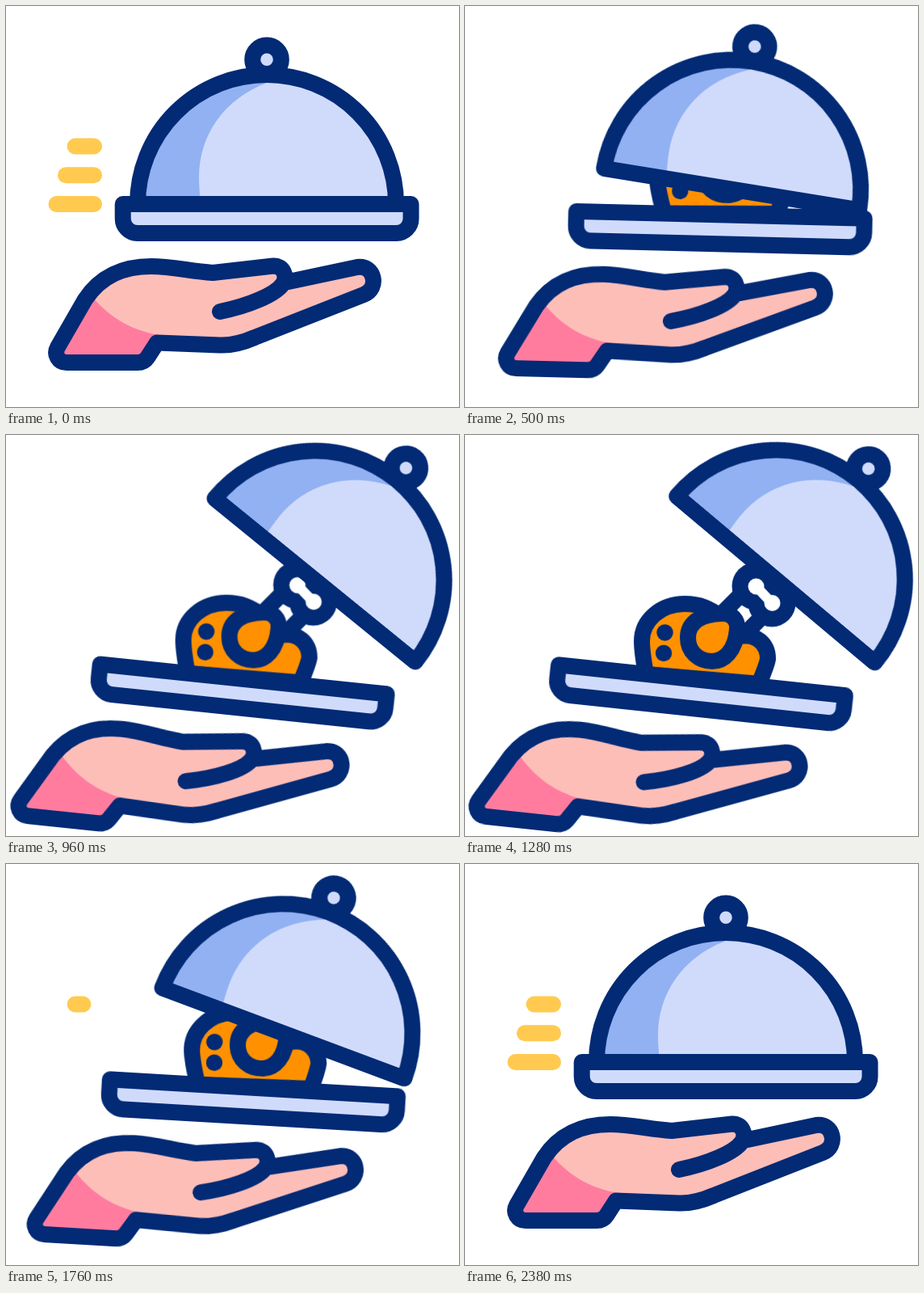
Animation of 561x496 px, one loop 2400 ms. Source, as an HTML page:

```html
<!DOCTYPE html>
<html lang="en">
<head>
<meta charset="utf-8">
<title>Serving dish</title>
<style>
html, body { margin: 0; width: 100%; height: 100%; overflow: hidden; background: #fff; }
svg { display: block; width: 561px; height: 496px; }

.ink { stroke: #022a75; stroke-width: 20; stroke-linejoin: round; stroke-linecap: round; }
.dark { fill: #022a75; }
.pale { fill: #d0dbfc; }
.shade { fill: #92b1f2; }
.skin { fill: #fdbeb8; }
.cuff { fill: #ff7c9f; }
.roast { fill: #ff9100; }
.none { fill: none; }

.serve { transform-origin: 265px 378px; animation: serve 2.4s infinite; }
.lid { transform-origin: 483px 245px; animation: lid 2.4s infinite; }
@keyframes serve {
  0% { transform: translate(0, 0) rotate(0); animation-timing-function: cubic-bezier(.8, 0, .165, 1); }
  50% { transform: translate(-43.5px, 51.5px) rotate(6.1deg); animation-timing-function: cubic-bezier(.8, 0, .135, 1); }
  100% { transform: translate(0, 0) rotate(0); }
}
@keyframes lid {
  0% { transform: translate(0, 0) rotate(0); animation-timing-function: cubic-bezier(.8, 0, .165, 1); }
  50% { transform: translate(50.6px, -44.5px) rotate(34deg); animation-timing-function: cubic-bezier(.78, 0, .135, 1); }
  100% { transform: translate(0, 0) rotate(0); }
}

.dash {
  stroke: #ffca4f; stroke-width: 20; stroke-linecap: round;
  stroke-dasharray: 10 20;
  animation: dash 2.4s ease-in-out infinite;
}
.dash:nth-child(2) { animation-delay: 102ms; }
.dash:nth-child(3) { animation-delay: 204ms; }
/* wipes out to the right, later draws in from the left */
@keyframes dash {
  0% { stroke-dashoffset: 0; }
  8.33% { stroke-dashoffset: -10.1; }
  8.34%, 69.6% { stroke-dashoffset: 10.1; }
  77.9%, 100% { stroke-dashoffset: 0; }
}
</style>
</head>
<body>
<svg viewBox="0 0 561 496">
  <g>
    <path class="dash" pathLength="10" d="M85.6 173.5H109"/>
    <path class="dash" pathLength="10" d="M74 209.3H109"/>
    <path class="dash" pathLength="10" d="M62.5 245H109"/>
  </g>

  <g class="serve">
    <!-- hand -->
    <path class="skin" d="M75 441C65 441 59 431 64 422L98 363C118 333 146 322 180 322C205 322 228 328 256 330L331 322C341 321 347 331 344 341L435 323C456 320 463 349 443 357L308 410C292 417 280 420 265 419.5L187 416.5L175 435Q171 441 163 441Z"/>
    <path class="cuff" d="M75 441C65 441 59 431 64 422L103 355C125 383 153 401 190 407L187 416.5L175 435Q171 441 163 441Z"/>
    <path class="ink none" d="M350 341L435 323C456 320 463 349 443 357L308 410C292 417 280 420 265 419.5L187 416.5L175 435Q171 441 163 441H75C65 441 59 431 64 422L98 363C118 333 146 322 180 322C205 322 228 328 256 330L331 321.5C343 321 349 334 343 343.5C334 357 300 371 265 378"/>

    <!-- roast, drawn in its tilted pose -->
    <g transform="translate(265 378) rotate(-6.1) translate(-221.5 -429.5)">
      <path d="M330 236L371 195" stroke="#022a75" stroke-width="58"/>
      <path d="M330 236L371 195" stroke="#fff" stroke-width="18"/>
      <g class="dark">
        <circle cx="360" cy="187" r="29.5"/>
        <circle cx="380" cy="208" r="29.5"/>
      </g>
      <g fill="#fff">
        <circle cx="360.5" cy="187.5" r="10"/>
        <circle cx="380.5" cy="208" r="10"/>
        <path d="M360 187L380 208" stroke="#fff" stroke-width="12"/>
      </g>
      <path class="ink roast" d="M224 296C219 268 219 262 219 255C219 229 243 209 272 209C290 209 303 214 318 226L342 249C360 246 375 258 375 277Q374 284 364 308Z"/>
      <g class="dark">
        <circle cx="247.5" cy="244.5" r="10.2"/>
        <circle cx="246" cy="270" r="10.2"/>
      </g>
      <path class="ink roast" d="M276 251C276 233 290 222 318 221C330 220 338 229 337 240C335 268 320 280 306 280C289 280 276 268 276 251Z"/>
    </g>

    <!-- tray -->
    <path class="ink pale" d="M144.7 245H501.5V263a18 18 0 0 1-18 18H162.7a18 18 0 0 1-18-18Z"/>

    <g class="lid">
      <circle class="ink pale" cx="323" cy="66.3" r="17.8"/>
      <path class="pale" d="M163 245a160 160 0 0 1 320 0Z"/>
      <path class="shade" d="M163 245A160 160 0 0 1 323 85V95C270 115 239 160 239 212Q239 224 241 245Z"/>
      <path class="ink none" d="M163 245a160 160 0 0 1 320 0Z"/>
    </g>
  </g>
</svg>
</body>
</html>
```
